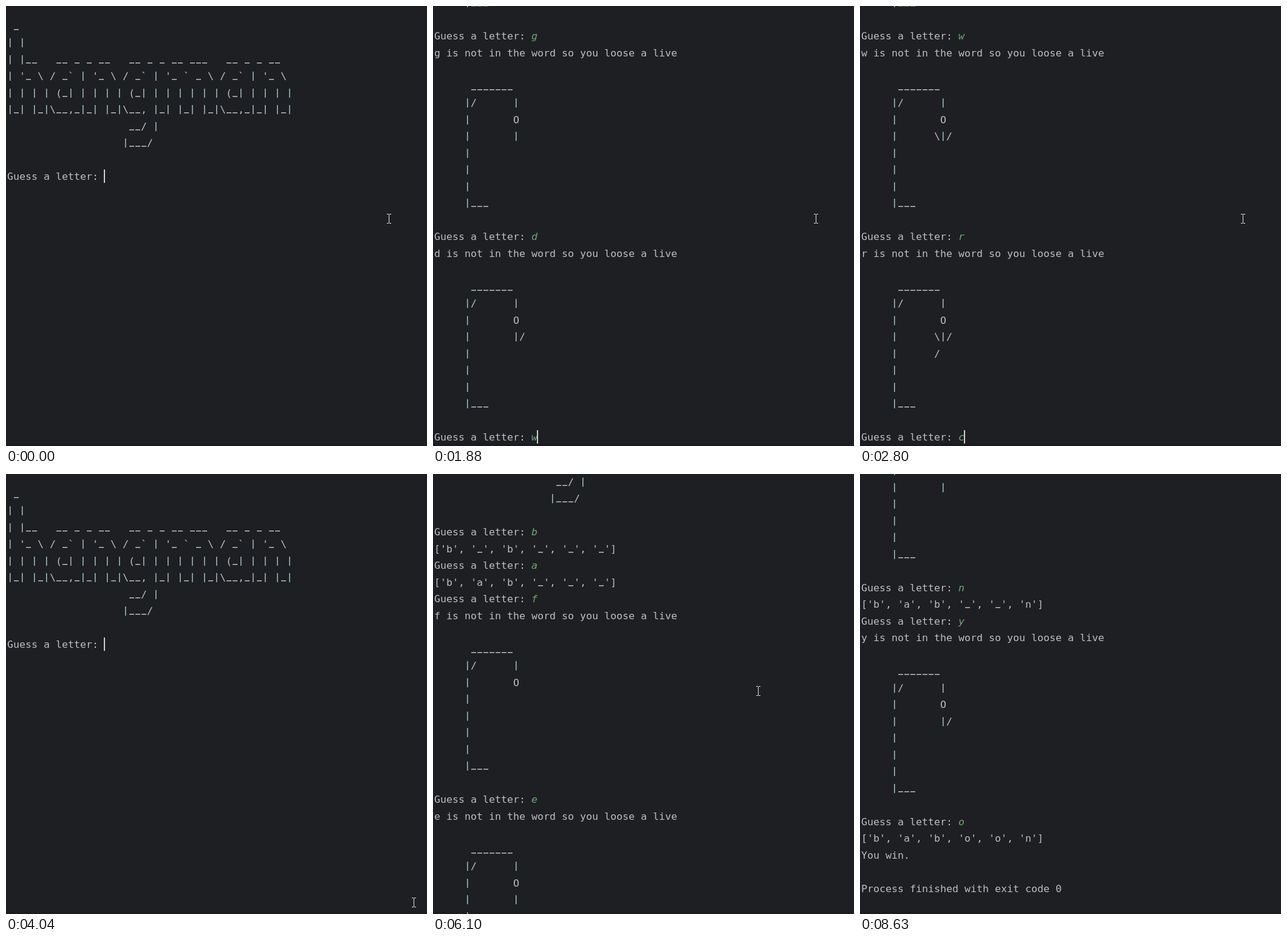
An HTML page with a canvas for the animation above (8690 ms loop, 693 by 724 pixels).

```html
<!DOCTYPE html>
<html lang="en">
<meta charset="utf-8">
<title>Hangman console</title>
<style>
  html, body { margin: 0; width: 100%; height: 100%; overflow: hidden; background: #1e1f22; }
  canvas { display: block; }
</style>
<canvas id="stage" width="693" height="724"></canvas>
<script>
const ctx = document.getElementById('stage').getContext('2d');
const LOOP = 8690, ROW = 27.5, COL = 10, LEFT = 2, FIRST = 5.5, LAST = 709.5;
const FONT = '16.6px "DejaVu Sans Mono", "Noto Sans Mono", monospace';
const TEXT = '#bcbec4', BAR = '#9dbfc6', INPUT = '#6aab73', CARET = '#ced0d6';
const PROMPT = 'Guess a letter: ';
const EXIT = ['', 'Process finished with exit code 0', ''];

const BANNER = String.raw`
 _
| |
| |__   __ _ _ __   __ _ _ __ ___   __ _ _ __
| '_ \ / _${'`'} | '_ \ / _${'`'} | '_ ${'`'} _ \ / _${'`'} | '_ \
| | | | (_| | | | | (_| | | | | | | (_| | | | |
|_| |_|\__,_|_| |_|\__, |_| |_| |_|\__,_|_| |_|
                    __/ |
                   |___/
`.split('\n');

// Each guess: time typed, time entered, time answered, letter, answer
// (a word pattern, or the number of lives lost so far).
const GAMES = [
  { start: 0, end: 3420, caretOff: 3100, closing: ['You loose.', ...EXIT], guesses: [
    [210, 280, 350, 'a', '_a____'],
    [430, 500, 560, 'd', 1],
    [700, 790, 850, 'g', 2],
    [1190, 1470, 1470, 'd', 3],
    [1690, 1890, 1950, 'w', 4],
    [2200, 2310, 2410, 'r', 5],
    [2700, 2850, 2930, 'c', 6]] },
  { start: 3700, end: LOOP, caretOff: 8180, closing: ['You win.', ...EXIT], guesses: [
    [4440, 4600, 4600, 'b', 'b_b___'],
    [4800, 4950, 5020, 'a', 'bab___'],
    [5320, 5500, 5560, 'f', 1],
    [5750, 5870, 5940, 'e', 2],
    [6400, 6500, 6570, 'n', 'bab__n'],
    [6850, 7030, 7150, 'y', 3],
    [7380, 7520, 7590, 'o', 'baboon']] }
];

// Moments when the console lags behind its last line: from, to, scroll
const LAGS = [[5940, 6100, 100], [6100, 6130, 185]];

// Mouse: time, x, y
const MOUSE = [
  [0, 630, 350], [2900, 630, 350], [3150, 560, -20], [3151, 668, 740], [3760, 668, 740],
  [3960, 671, 705], [4200, 671, 705], [4520, 543, 587], [4850, 541, 287], [5200, 535, 357],
  [7480, 535, 357], [7840, 584, 467], [8250, 662, 740], [LOOP, 662, 740]
];

function gallows(lost) {
  const torso = ['', '|', '|/', '\\|/'][Math.min(lost - 1, 3)];
  const legs = ['', '/', '/ \\'][Math.max(lost - 4, 0)];
  const post = (part, at) => '     |' + (part ? ' '.repeat(at - 6) + part : '');
  return ['', '      _______', '     |/      |', post('O', 13), post(torso, lost > 3 ? 12 : 13),
    post(legs, 12), post(), post(), '     |___', ''];
}

function answer(letter, reply) {
  if (typeof reply === 'number')
    return [letter + ' is not in the word so you loose a live', ...gallows(reply)];
  return ['[' + [...reply].map(c => `'${c}'`).join(', ') + ']'];
}

// Console lines and caret column at time t; the caret is on the last line.
function consoleAt(game, t) {
  const lines = BANNER.map(text => ({ text }));
  const add = list => list.forEach(text => lines.push({ text }));
  add([PROMPT]);
  let col = PROMPT.length;
  for (const [typed, entered, answered, letter, reply] of game.guesses) {
    if (t < typed) break;
    lines[lines.length - 1].input = letter;
    col = PROMPT.length + 1;
    if (t < entered) break;
    col = 0;
    if (t < answered) { add(['']); break; }
    add(answer(letter, reply));
    const over = reply === 6 || reply === 'baboon';
    add(over ? game.closing : [PROMPT]);
    if (!over) col = PROMPT.length;
  }
  return { lines, col };
}

function drawChar(c, x, y) {
  if (c === '_') ctx.fillRect(x + 1, y + 5, 8, 1.5);
  else if (c === '|') {
    ctx.fillStyle = BAR;
    ctx.fillRect(x + 4, y - 7, 1.5, 15);
    ctx.fillStyle = TEXT;
  } else if (c !== ' ') ctx.fillText(c, x, y + 6);
}

function drawConsole(game, t) {
  const { lines, col } = consoleAt(game, t);
  const bottom = FIRST + ROW * (lines.length - 1);
  const lag = LAGS.find(([from, to]) => t >= from && t < to);
  const scroll = lag ? lag[2] : Math.max(0, bottom - LAST);
  lines.forEach(({ text, input }, i) => {
    const y = Math.floor(FIRST + ROW * i - scroll);
    if (y < -20 || y > 744) return;
    ctx.font = FONT;
    ctx.fillStyle = TEXT;
    [...text].forEach((c, k) => drawChar(c, LEFT + COL * k, y));
    if (input) {
      ctx.font = 'italic ' + FONT;
      ctx.fillStyle = INPUT;
      ctx.fillText(input, LEFT + COL * text.length, y + 6);
    }
  });
  if (t < game.caretOff) {
    ctx.fillStyle = CARET;
    ctx.fillRect(Math.max(LEFT, LEFT + COL * col - 1), Math.floor(bottom - scroll) - 11, 2, 22);
  }
}

function drawMouse(t) {
  const i = MOUSE.findIndex(key => key[0] > t);
  const [t0, x0, y0] = MOUSE[i - 1], [t1, x1, y1] = MOUSE[i];
  const p = (t - t0) / (t1 - t0), e = p * p * (3 - 2 * p);
  const x = Math.round(x0 + (x1 - x0) * e), y = Math.round(y0 + (y1 - y0) * e);
  ctx.fillStyle = '#e4e4e4';
  ctx.fillRect(x, y - 7, 1, 14);
  for (const edge of [y - 8, y + 7]) {
    ctx.fillRect(x - 3, edge, 3, 1);
    ctx.fillRect(x + 1, edge, 3, 1);
  }
}

function draw(now) {
  const t = Math.max(0, now) % LOOP;
  ctx.fillStyle = '#1e1f22';
  ctx.fillRect(0, 0, 693, 724);
  ctx.fillStyle = '#1b1c1f';
  ctx.fillRect(0, 720, 693, 4);
  const game = GAMES.find(g => t >= g.start && t < g.end);
  if (game) drawConsole(game, t);
  drawMouse(t);
}

const begin = performance.now();
function tick() {
  draw(performance.now() - begin);
  requestAnimationFrame(tick);
}
tick();
</script>
</html>
```
